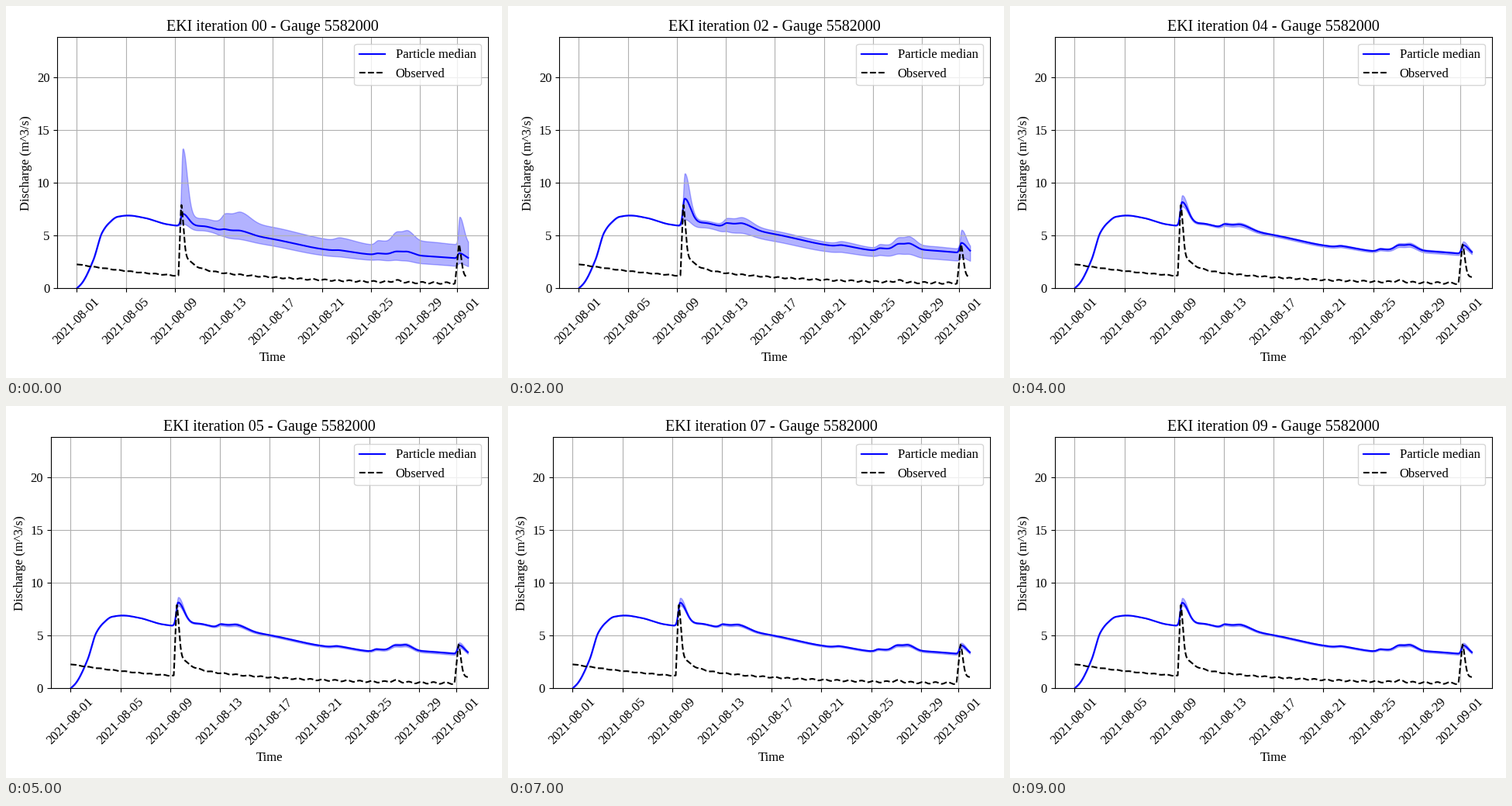
A matplotlib script that plays this animation: 640x480 px, repeating every 10000 ms.

```python
import matplotlib.pyplot as plt
import numpy as np
from matplotlib.animation import FuncAnimation

W, H, DPI = 640, 480, 100
plt.rcParams.update({"font.family": "Liberation Serif", "font.size": 12})

SPAN = 31.92                      # days in the series
DAYS = np.linspace(0, SPAN, 767)  # hourly
BOTTOM, HEIGHT, RIGHT = 115.6, 324, 621.55
PX_PER_UNIT = 13.6


def smooth(points):
    """Monotone cubic through (day, value) points."""
    x, y = np.array(points, float).T
    h, s = np.diff(x), np.diff(y) / np.diff(x)
    m = np.r_[s[0], np.zeros(len(s) - 1), s[-1]]
    for j in range(1, len(s)):
        if s[j - 1] * s[j] > 0:
            w1, w2 = 2 * h[j] + h[j - 1], h[j] + 2 * h[j - 1]
            m[j] = (w1 + w2) / (w1 / s[j - 1] + w2 / s[j])
    i = np.clip(np.searchsorted(x, DAYS, side="right") - 1, 0, len(s) - 1)
    u = (DAYS - x[i]) / h[i]
    v = 1 - u
    return (v * v * ((1 + 2 * u) * y[i] + u * h[i] * m[i])
            + u * u * ((3 - 2 * u) * y[i + 1] - v * h[i] * m[i + 1]))


def bump(peak, size, rise, fall):
    d = DAYS - peak
    return size * np.exp(-.5 * (d / np.where(d < 0, rise, fall)) ** 2)


def floods(width=1):
    """The two sharp peaks, optionally narrowed."""
    return (bump(8.64, 2.15, .14 * width, .48 * width)
            + bump(31.22, .83, .13 * width, .45 * width))


TREND = smooth([(0, 0), (.42, .5), (1.37, 2.75), (2.07, 5.3), (2.63, 6.2),
                (3.33, 6.8), (4.2, 6.92), (5.5, 6.7), (7.4, 6.08),
                (8.25, 5.96), (10.2, 6.15), (11.5, 5.86), (16, 5.05),
                (20, 4.07), (24, 3.5), (30.8, 3.28), (SPAN, 3.18)])
SHOWERS = (bump(12.1, .33, .25, .6) + bump(13.4, .48, .5, .75)
           + bump(21.5, .2, .4, 1.3) + bump(24.6, .24, .25, .8)
           + bump(26.1, .6, .4, .5) + bump(27.05, .6, .4, .55)
           + bump(28.5, .13, .5, 1.2))
# How strongly the ensemble members differ over time
SPREAD = smooth([(0, 0), (8.25, 0), (8.7, .75), (11, .75), (12.5, 1.15),
                 (16, 1.15), (24, .92), (28, 1.2), (SPAN, 1.35)])


def response(level, shower, flood, width=1):
    return level * SPREAD + shower * SHOWERS + flood * floods(width)


def curves(k):
    """Median, lower and upper discharge of iteration k."""
    median = TREND + SHOWERS + floods()
    if k == 0:
        median += response(-.32, -.37, -.38)
        up = response(1, 1.25, 2.55, .7)
        down = response(.55, .35, .25)
    else:
        narrow = .17 + .83 / (1 + ((k - 1) / 1.7) ** 4)
        median += .38 ** (k - 1) * response(.22, .2, .4)
        up = narrow * response(.32, .52, 1.12, .7)
        down = narrow ** 1.2 * response(.65, .55, .8)
    return median, median - down, median + up


def flood_wave(start, peak, sharp, quick, slow):
    """Linear rise, then a sharp, a quick and a slow recession."""
    d = np.maximum(DAYS - peak, 0)
    fall = (sharp * np.exp(-.5 * (d / .18) ** 2) + quick * np.exp(-d / .78)
            + slow * np.exp(-d / 8.5))
    return fall * np.clip((DAYS - start) / (peak - start), 0, 1)


def observed():
    flow = .35 + 1.95 * np.exp(-DAYS / 10) + bump(26.1, .15, .4, .4)
    flow += flood_wave(8.3, 8.52, 4.15, 1.9, .75)
    flow += flood_wave(30.85, 31.17, 2.1, 1.5, 0)
    trough = .98 - .011 * DAYS
    return flow - (.02 + .0022 * DAYS) * np.cos(2 * np.pi * (DAYS - trough))


fig, ax = plt.subplots(figsize=(W / DPI, H / DPI), dpi=DPI)
median, low, high = curves(0)
band = ax.fill_between(DAYS, low, high, color="blue", alpha=.3)
line, = ax.plot(DAYS, median, color="blue", label="Particle median")
ax.plot(DAYS, observed(), "k--", label="Observed")

ax.set_xlim(-.05 * SPAN, 1.05 * SPAN)
ax.set_ylim(0, HEIGHT / PX_PER_UNIT)
ax.set_yticks(range(0, 21, 5))
ax.set_xticks([*range(0, 29, 4), 31],
              [f"2021-08-{d:02d}" for d in range(1, 30, 4)] + ["2021-09-01"],
              rotation=45)
ax.set_xlabel("Time")
ax.set_ylabel("Discharge (m^3/s)")
ax.grid(True)
ax.legend(loc="upper right")


def draw(k):
    median, low, high = curves(k)
    line.set_ydata(median)
    outline = np.column_stack([np.r_[DAYS, DAYS[::-1]], np.r_[low, high[::-1]]])
    band.set_verts([outline])
    ax.set_title(f"EKI iteration {k:02d} - Gauge 5582000")
    left = 66 if k < 3 else 57.65
    ax.set_position([left / W, BOTTOM / H, (RIGHT - left) / W, HEIGHT / H])
    return line, band


anim = FuncAnimation(fig, draw, frames=10, interval=1000, repeat=True,
                     init_func=lambda: draw(0), blit=False)
plt.show()
```
